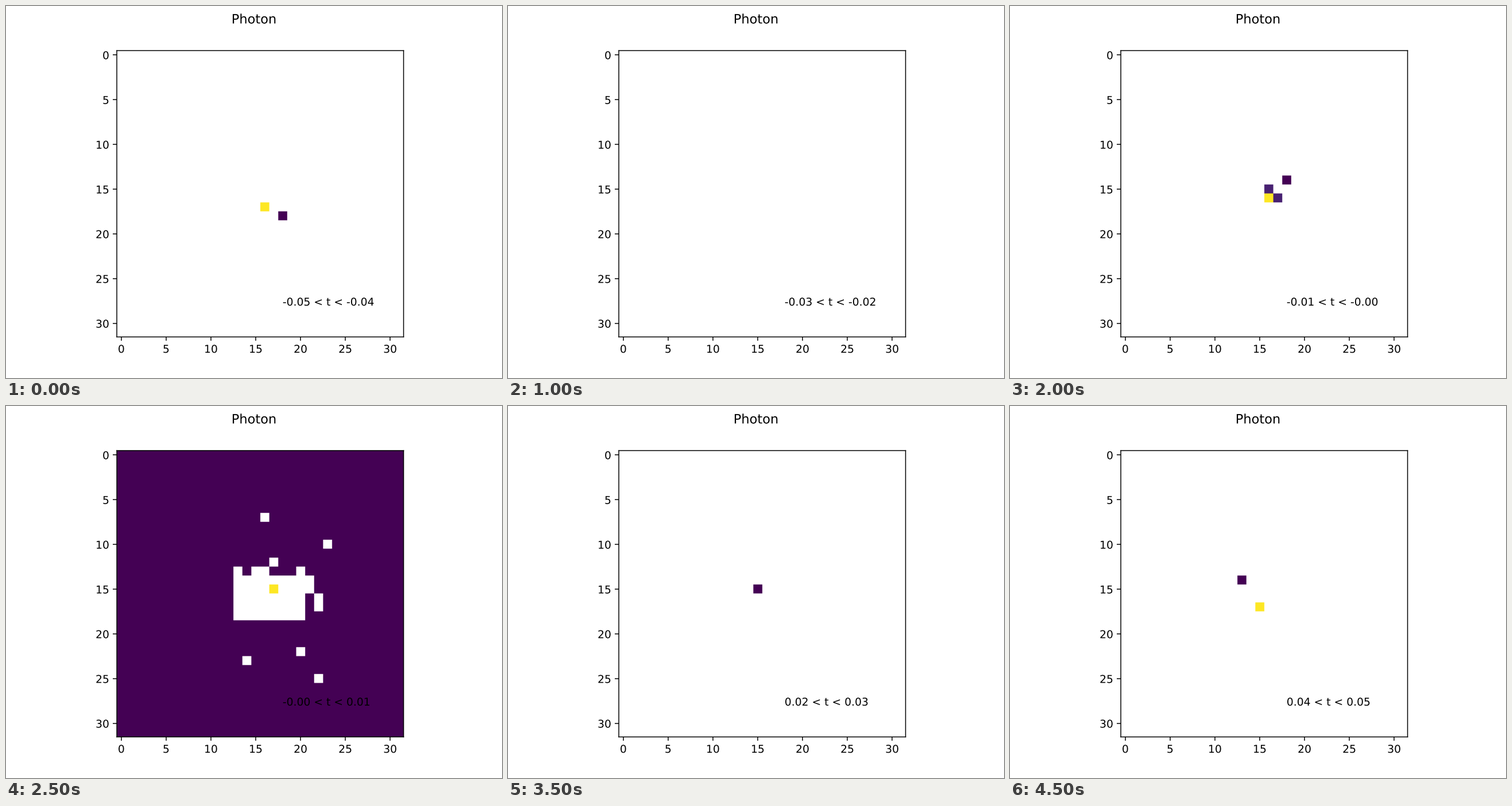
Recreate the animation shown at these times as a matplotlib script. Size 864 by 648 pixels, loop 5 s.

```python
import numpy as np
import matplotlib.pyplot as plt
from matplotlib.animation import FuncAnimation
from matplotlib.patheffects import Normal

SIZE = 32
STEPS = 10
STEP_MS = 500
ZOOM = 23  # samples per cell, for smooth cell edges

# step -> hit cells (column, row), brightest first
HITS = {
    0: [(16, 17), (18, 18)],
    3: [(13, 13)],
    4: [(16, 16), (16, 15), (17, 16), (18, 14)],
    7: [(15, 15)],
    9: [(15, 17), (13, 14)],
}
STRAY = [(16, 7), (23, 10), (17, 12), (20, 22), (14, 23), (22, 25)]


def spread(cells):
    """Levels fall off with distance from the first cell, weakest at zero."""
    away = np.hypot(*(cells - cells[0]).T)
    levels = np.maximum(0, 1 - 0.91 * away)
    return levels - levels.min()


def burst():
    grid = np.zeros((SIZE, SIZE))
    grid[14:19, 13:21] = np.nan
    grid[14:16, 21] = np.nan
    grid[16:18, 22] = np.nan
    grid[13, [13, 15, 16, 20]] = np.nan
    cols, rows = np.transpose(STRAY)
    grid[rows, cols] = np.nan
    grid[15, 17] = 1
    return grid


def hit_map(step):
    if step == STEPS // 2:
        grid = burst()
    else:
        grid = np.full((SIZE, SIZE), np.nan)
        if step in HITS:
            cells = np.array(HITS[step])
            grid[cells[:, 1], cells[:, 0]] = spread(cells)
    return np.kron(grid, np.ones((ZOOM, ZOOM)))


def time_label(step):
    # the tiny offset keeps the sign of a zero just below t = 0
    low = (step - 5) / 100 - 1e-9
    return f"{low:.2f} < t < {low + 0.01:.2f}"


plt.rcParams.update({"font.family": "DejaVu Sans", "text.hinting": "none"})
fig, ax = plt.subplots(figsize=(6.4, 4.8), dpi=135)
fig.subplots_adjust(left=286 / 1280, right=1026 / 1280,
                    bottom=106 / 960, top=845 / 960)
title = fig.suptitle("Photon")

cmap = plt.get_cmap("viridis").with_extremes(bad="white")
edge = SIZE - 0.5
image = ax.imshow(hit_map(0), cmap=cmap, vmin=0, vmax=1, aspect="auto",
                  extent=(-0.5, edge, edge, -0.5),
                  interpolation="bilinear", interpolation_stage="rgba")
label = ax.text(18, 28, time_label(0))
ax.set_xticks(range(0, SIZE, 5))
ax.set_yticks(range(0, SIZE, 5))

# place outlines and letters at sub-pixel positions
for spine in ax.spines.values():
    spine.set_snap(False)
for text in [title, label, *ax.get_xticklabels(), *ax.get_yticklabels()]:
    text.set_path_effects([Normal()])


def update(step):
    image.set_data(hit_map(step))
    label.set_text(time_label(step))
    return image, label


anim = FuncAnimation(fig, update, frames=STEPS, interval=STEP_MS,
                     repeat=True, repeat_delay=0)
plt.show()
```
